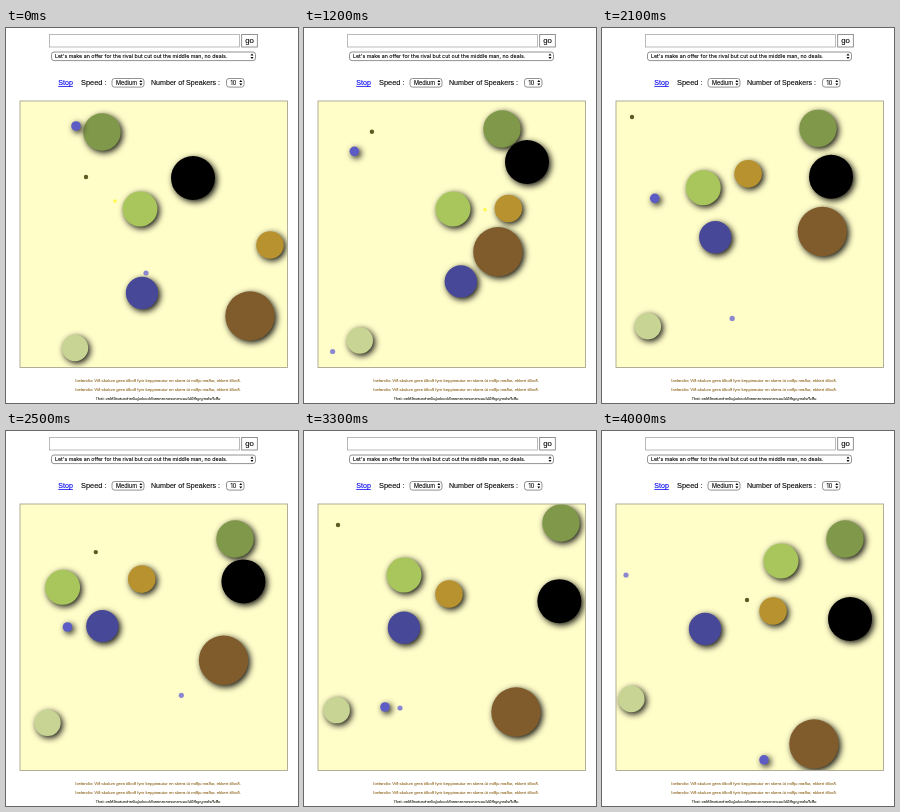
These frames come from a looping animation (292x375 px, 4.1 s). An HTML page:

```html
<!DOCTYPE html>
<html lang="en">
<head>
<meta charset="utf-8">
<title>Bouncing speakers</title>
<style>
html, body { margin: 0; width: 100%; height: 100%; overflow: hidden; background: #fff; }
svg { display: block; width: 292px; height: 375px; }
text { font-family: "Liberation Sans", Arial, sans-serif; font-size: 7.1px; stroke: currentColor; stroke-width: .1; }
.ui { font-family: Inter, Roboto, sans-serif; font-size: 5.5px; }
.long { font-size: 5.3px; }
.link { color: #00e; fill: #00e; text-decoration: underline; }
.said { font-size: 4.25px; color: #96702e; fill: #96702e; text-anchor: middle; }
.thai { font-family: "Noto Sans Thai", "Noto Sans", "Noto Sans CJK", sans-serif; font-size: 3.95px; color: #333326; fill: #333326; }
.box { fill: #fff; stroke: #777; stroke-width: .8; }
</style>
</head>
<body>
<svg viewBox="0 0 292 375">
  <defs>
    <filter id="shade" x="-150%" y="-150%" width="400%" height="400%" color-interpolation-filters="sRGB">
      <feDropShadow dx="2" dy="2" stdDeviation="3.4" flood-color="#000" flood-opacity=".95"/>
    </filter>
    <clipPath id="room"><rect x="14" y="73" width="267.5" height="266.5"/></clipPath>
    <path id="arrows" d="M-1.5-.7L0-2.8 1.5-.7zM-1.5.7L0 2.8 1.5.7z"/>
  </defs>

  <rect class="box" x="43.5" y="6.5" width="190" height="12.5" style="stroke:#aaa"/>
  <rect class="box" x="235.7" y="6.5" width="15.6" height="12.5"/>
  <text x="239.2" y="15.3" style="font-size:7.8px">go</text>

  <rect class="box" x="45.5" y="24" width="204" height="8.6" rx="2.5"/>
  <text class="ui long" x="49" y="30.2">Let's make an offer for the rival but cut out the middle man, no deals.</text>
  <use href="#arrows" x="246" y="28.3"/>

  <text class="link" x="52.3" y="57">Stop</text>
  <text x="75" y="57" style="font-size:7.4px">Speed :</text>
  <rect class="box" x="106" y="50.5" width="32" height="8.6" rx="2.5"/>
  <text class="ui" x="110" y="56.8">Medium</text>
  <use href="#arrows" x="134.9" y="54.8"/>
  <text x="145" y="57">Number of Speakers :</text>
  <rect class="box" x="220.5" y="50.5" width="17.5" height="8.6" rx="2.5"/>
  <text class="ui" x="224.5" y="56.8">10</text>
  <use href="#arrows" x="234.8" y="54.8"/>

  <rect x="14" y="73" width="267.5" height="266.5" fill="#fffdc8"/>
  <g id="balls" clip-path="url(#room)"></g>
  <rect x="14" y="73" width="267.5" height="266.5" fill="none" stroke="#a8a690" stroke-width=".9"/>

  <text class="said" x="152" y="353.8">Icelandic: Við skulum gera tilboð fyrir keppinautur en skera út miðju maður, ekkert tilboð.</text>
  <text class="said" x="152" y="362.8">Icelandic: Við skulum gera tilboð fyrir keppinautur en skera út miðju maður, ekkert tilboð.</text>
  <text class="said thai" x="152" y="372.3">Thai: ขอให้ข้อเสนอสำหรับคู่แข่งแต่ตัดออกจากตรงกลางคนไม่มีสัญญาอะไรทั้งสิ้น</text>
</svg>
<script>
const LOOP = 4100, STEP = 100;
const ROOM = { left: 14, top: 73, right: 281, bottom: 339 };
const layer = document.getElementById('balls');
const balls = [];

// hits: [time, x, y] where a ball changes speed. Positions may lie beyond
// the walls; fold() mirrors them back, which makes every wall bounce.
function ball(fill, r, hits, shown = () => true) {
  const el = document.createElementNS('http://www.w3.org/2000/svg', 'circle');
  el.setAttribute('r', r);
  el.setAttribute('fill', fill);
  if (r > 4) el.setAttribute('filter', 'url(#shade)');
  layer.appendChild(el);
  balls.push({ el, r, hits, shown });
}

ball('#80984a', 18.7, [[0, 96, 104], [600, 127, 96], [1200, 198, 101], [2100, 216, 83],
  [2400, 226, 74], [2900, 241, 81], [3300, 257, 91.4], [4000, 281.6, 108]]);
ball('#000', 22, [[0, 187, 150], [1200, 223, 134], [2000, 227, 149], [2400, 235, 148],
  [2900, 247, 160], [4000, 270, 188]]);
ball('#805c2c', 24.7, [[0, 244, 288], [1270, 191, 220], [2000, 221, 197], [3300, 212, 281], [4000, 212, 313]]);
ball('#b8922e', 13.8, [[0, 264, 217], [970, 196, 177], [1300, 208, 182], [1950, 150, 145],
  [2840, 127, 150], [3300, 145, 163], [4000, 171, 180]]);
ball('#a8c65c', 17.5, [[0, 134, 181], [970, 166, 191], [1200, 149, 181], [1950, 118, 161],
  [2900, 12, 153], [3300, -37, 144], [4000, -116, 130]]);
ball('#484898', 16.2, [[0, 136, 265], [1270, 158, 399.6], [2420, 96, 450.6], [4000, 103, 447.6]]);
ball('#c8d494', 13.2, [[0, 69, 320], [4000, 25, 383.6]]);
ball('#5c5cc4', 4.8, [[0, 70, 98], [600, 94, 92], [2400, -37, 186], [3300, 81, 276], [4000, 162, 339.6]]);
ball('#5c5c20', 2.2, [[0, 80, 149], [1720, -85.6, 2.4], [2100, 2.4, 61.4], [2620, 116, 139],
  [2900, 68, 105], [3300, -1.6, 56.4], [4000, -112.6, -18.6]]);
ball('#8c88d0', 2.6, [[0, 140, 245], [2630, -156.8, 417], [3300, -62.8, 277], [4000, 24, 144]]);
ball('#fff848', 1.8, [[0, 109, 173], [600, 101, 90], [1260, 189, 191], [2600, 70, 100],
  [2880, 115, 139], [3150, 80, 95]], t => t < 1300 || Math.abs(t - 2880) < 280);

function fold(v, lo, hi) {
  const w = hi - lo;
  const u = (((v - lo) % (2 * w)) + 2 * w) % (2 * w);
  return lo + (u > w ? 2 * w - u : u);
}

function at(hits, t) {
  let i = 0;
  while (i + 2 < hits.length && t > hits[i + 1][0]) i++;
  const [t0, x0, y0] = hits[i], [t1, x1, y1] = hits[i + 1];
  const k = Math.min(1, (t - t0) / (t1 - t0));
  return [x0 + (x1 - x0) * k, y0 + (y1 - y0) * k];
}

function draw(ms) {
  const t = Math.floor(ms % LOOP / STEP) * STEP;
  for (const { el, r, hits, shown } of balls) {
    const [x, y] = at(hits, t);
    el.setAttribute('cx', fold(x, ROOM.left + r, ROOM.right - r).toFixed(2));
    el.setAttribute('cy', fold(y, ROOM.top + r, ROOM.bottom - r).toFixed(2));
    el.setAttribute('visibility', shown(t) ? 'visible' : 'hidden');
  }
}

const start = performance.now();
function tick() {
  draw(performance.now() - start);
  requestAnimationFrame(tick);
}
tick();
</script>
</body>
</html>
```
